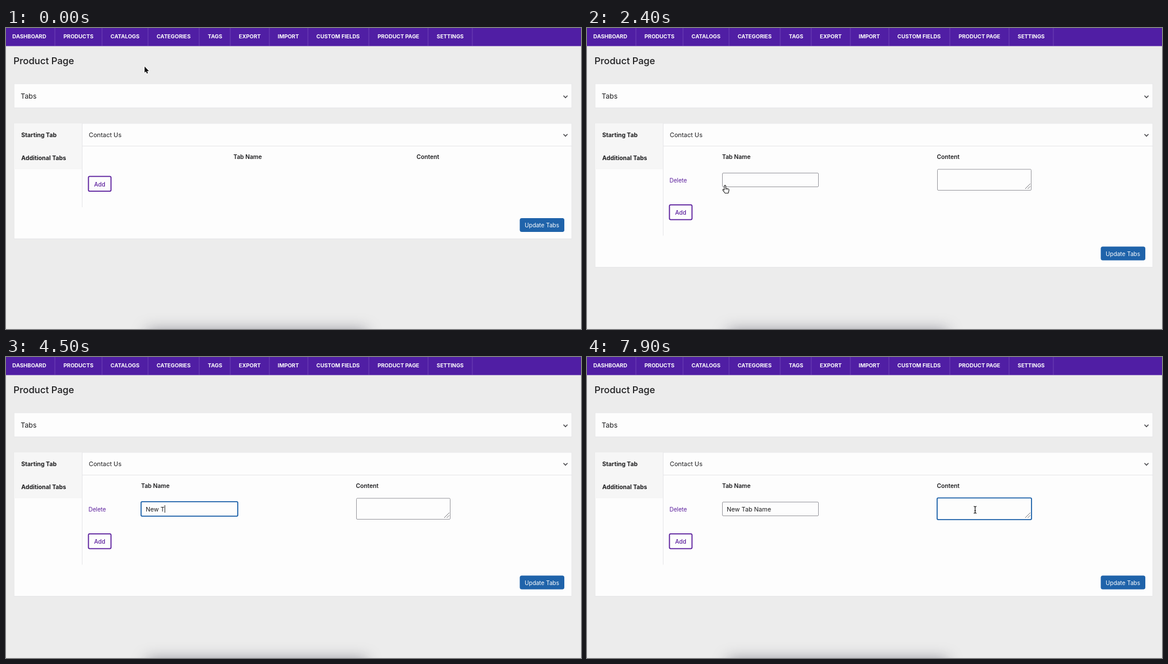
An HTML page with a canvas for the animation above (8 s loop, 1000 by 524 pixels).

```html
<!DOCTYPE html>
<html lang="en">
<head>
<meta charset="utf-8">
<title>Product Page tabs</title>
<style>
html, body { margin: 0; width: 100%; height: 100%; overflow: hidden; background: #ececec; }
canvas { display: block; }
</style>
</head>
<body>
<canvas id="stage" width="1000" height="524"></canvas>
<script>
const ctx = document.getElementById('stage').getContext('2d');
const LOOP = 8000;
const PAGE = '#ececec', PANEL = '#fdfdfd', LINE = '#e6e6e8';
const INK = '#1c1c1e', PURPLE = '#5a1d9c', BLUE = '#1f63aa';

const NAV = [
  ['DASHBOARD', 40.5, 85], ['PRODUCTS', 126, 167], ['CATALOGS', 207, 247],
  ['CATEGORIES', 291.5, 336], ['TAGS', 363.5, 390], ['EXPORT', 424, 458],
  ['IMPORT', 491, 525], ['CUSTOM FIELDS', 577.5, 631],
  ['PRODUCT PAGE', 682.5, 734], ['SETTINGS', 772.5, 811]
];

// Moments of the interaction, in ms
const ADD_HOVER = 1480, ADD_CLICK = 1700, ADD_LEAVE = 1850;
const NAME_FOCUS = 2900, TYPE_START = 3720, TYPE_STEP = 180;
const MOUSE_BACK = 6050, CONTENT_FOCUS = 6850, BLINK = 530;
const TAB_NAME = 'New Tab Name';

// Pointer path: time, x, y of the hotspot
const PATH = [
  [0, 241, 67], [300, 241, 67], [1100, 232, 209], [1550, 169, 273],
  [1650, 170, 277], [1850, 170, 277], [2400, 240, 274], [2750, 272, 266],
  [6050, 272, 266], [6650, 675, 266]
];

const ARROW = new Path2D('M0 0V10.8L2.4 8.6 4 12.3 5.8 11.5 4.3 7.9H7.6Z');
const HAND = new Path2D('M-1.3 1.2a1.3 1.3 0 0 1 2.6 0V5l4.2 1q1.5.4 1.4 2L6.3 11 5.5 13.5H0L-3.7 8.6q-.8-1.5.7-1.7L-1.3 8Z');
const IBEAM = new Path2D('M-2.5-6Q0-6 0-4.5Q0-6 2.5-6M0-4.5V4.5M-2.5 6Q0 6 0 4.5Q0 6 2.5 6M-1.3 1.5H1.3');

const clamp = v => Math.max(0, Math.min(1, v));
const ramp = (t, start, length) => clamp((t - start) / length);
const mix = (a, b, k) => `rgb(${a.map((v, i) => Math.round(v + (b[i] - v) * k))})`;

function text(str, x, y, size, color = INK, weight = 400, align = 'left') {
  ctx.font = `${weight} ${size}px Inter, sans-serif`;
  ctx.textAlign = align;
  ctx.fillStyle = color;
  ctx.fillText(str, x, y);
}

function rect(x, y, w, h, color) {
  ctx.fillStyle = color;
  ctx.fillRect(x, y, w, h);
}

function box(x, y, w, h, radius, fill, stroke, width = 1) {
  ctx.beginPath();
  ctx.roundRect(x + width / 2, y + width / 2, w - width, h - width, radius);
  ctx.fillStyle = fill;
  ctx.fill();
  ctx.strokeStyle = stroke;
  ctx.lineWidth = width;
  ctx.stroke();
}

function polyline(points, color, width) {
  ctx.beginPath();
  points.forEach(([x, y]) => ctx.lineTo(x, y));
  ctx.strokeStyle = color;
  ctx.lineWidth = width;
  ctx.stroke();
}

const chevron = y =>
  polyline([[969.5, y - 1.8], [973, y + 1.8], [976.5, y - 1.8]], '#4a4a4e', 1.5);

function dockShadow() {
  ctx.save();
  ctx.shadowColor = 'rgba(40,40,60,.5)';
  ctx.shadowBlur = 26;
  rect(246, 527, 380, 60, '#888');
  ctx.restore();
}

function header() {
  rect(0, 0, 1000, 31.5, '#501ea4');
  for (const [label, center, edge] of NAV) {
    text(label, center, 18, 9.3, '#fff', 700, 'center');
    rect(edge - 0.5, 0, 1, 31, '#6f43b6');
  }
  text('Product Page', 13, 63, 16.4, INK, 500);
}

function panels(t, shift) {
  box(13.5, 96.5, 971, 43, 0, PANEL, LINE);
  text('Tabs', 25.5, 122.5, 12.2);
  chevron(119.5);

  box(13.5, 165.5, 971, 202 + shift, 0, PANEL, LINE);
  rect(14, 166, 118, 80, '#f6f6f6');
  rect(132, 166, 1, 146 + shift, LINE);
  rect(132, 205, 852, 1, LINE);
  text('Starting Tab', 26.5, 189.5, 10.3, INK, 700);
  text('Additional Tabs', 26.5, 229.5, 10.3, INK, 700);

  const hover = ramp(t, 860, 100) * (1 - ramp(t, 1080, 150));
  text('Contact Us', 144, 190, 10.8, mix([28, 28, 30], [20, 105, 175], hover));
  chevron(186.5);
}

function caret(t, x, y, focus) {
  const typing = t >= TYPE_START && t < 5900;
  if (typing || Math.floor((t - focus) / BLINK) % 2 === 0) rect(x, y, 1, 13, '#222');
}

function field(x, y, w, h, focused) {
  if (focused) box(x - 1, y - 1, w + 2, h + 2, 2, PANEL, BLUE, 1.8);
  else box(x, y, w, h, 1.5, PANEL, '#98989e');
}

function tabRow(t) {
  const nameFocused = t >= NAME_FOCUS && t < CONTENT_FOCUS;
  const contentFocused = t >= CONTENT_FOCUS;
  const count = t < TYPE_START ? 0 : 1 + Math.floor((t - TYPE_START) / TYPE_STEP);
  const typed = TAB_NAME.slice(0, count);

  ctx.globalAlpha = 0.25 + 0.75 * ramp(t, ADD_CLICK, 400);
  text('Delete', 143.5, 268.5, 10, PURPLE);
  field(235, 252, 168, 25, nameFocused);
  field(609, 245.5, 164, 37.5, contentFocused);
  polyline([[762, 280], [771, 271]], '#77777c', 1);
  polyline([[766.5, 280], [771, 275.5]], '#77777c', 1);
  ctx.globalAlpha = 1;

  text(typed, 243, 268.5, 10.7);
  if (nameFocused) caret(t, 243 + ctx.measureText(typed).width, 258, NAME_FOCUS);
  if (contentFocused) caret(t, 617, 251, CONTENT_FOCUS);
}

function buttons(t, shift) {
  const fill = ramp(t, ADD_HOVER, 100) * (1 - ramp(t, ADD_LEAVE, 150));
  box(142.5, 257.5 + shift, 41, 27.5, 2, mix([253, 253, 253], [125, 50, 175], fill), PURPLE, 1.8);
  text('Add', 163, 275.5 + shift, 10, mix([90, 29, 156], [220, 185, 238], fill), 500, 'center');
  box(893.5, 331 + shift, 77.5, 24, 2.5, BLUE, BLUE);
  text('Update Tabs', 932, 347 + shift, 10, '#fff', 400, 'center');
}

function pointer(t) {
  if (t >= TYPE_START && t < MOUSE_BACK) return;
  let i = 0;
  while (i < PATH.length - 2 && t >= PATH[i + 1][0]) i++;
  const [t0, x0, y0] = PATH[i], [t1, x1, y1] = PATH[i + 1];
  const k = ramp(t, t0, t1 - t0);
  const x = x0 + (x1 - x0) * k, y = y0 + (y1 - y0) * k;

  ctx.save();
  ctx.translate(x, y);
  ctx.lineJoin = 'round';
  if (t >= 2450 && (x < 403 || x > 609)) {
    ctx.strokeStyle = '#fff';
    ctx.lineWidth = 2.6;
    ctx.stroke(IBEAM);
    ctx.strokeStyle = '#111';
    ctx.lineWidth = 1.2;
    ctx.stroke(IBEAM);
  } else if (t >= ADD_HOVER && t < 2450) {
    ctx.fillStyle = '#fff';
    ctx.strokeStyle = '#222';
    ctx.lineWidth = 1.1;
    ctx.fill(HAND);
    ctx.stroke(HAND);
    polyline([[1.3, 5], [1.3, 7.5]], '#222', 0.9);
    polyline([[3.6, 5.8], [3.6, 7.8]], '#222', 0.9);
  } else {
    ctx.strokeStyle = '#fff';
    ctx.lineWidth = 1.8;
    ctx.stroke(ARROW);
    ctx.fillStyle = '#0a0a0a';
    ctx.fill(ARROW);
  }
  ctx.restore();
}

function draw(now) {
  const t = now % LOOP;
  const added = t >= ADD_CLICK;
  const shift = added ? 49.5 : 0;
  rect(0, 0, 1000, 524, PAGE);
  dockShadow();
  header();
  panels(t, shift);
  text('Tab Name', added ? 235 : 395.5, 228, 10.2, INK, 600);
  text('Content', added ? 608.5 : 714, 228, 10.2, INK, 600);
  if (added) tabRow(t);
  buttons(t, shift);
  pointer(t);
  requestAnimationFrame(draw);
}
requestAnimationFrame(draw);
</script>
</body>
</html>
```
